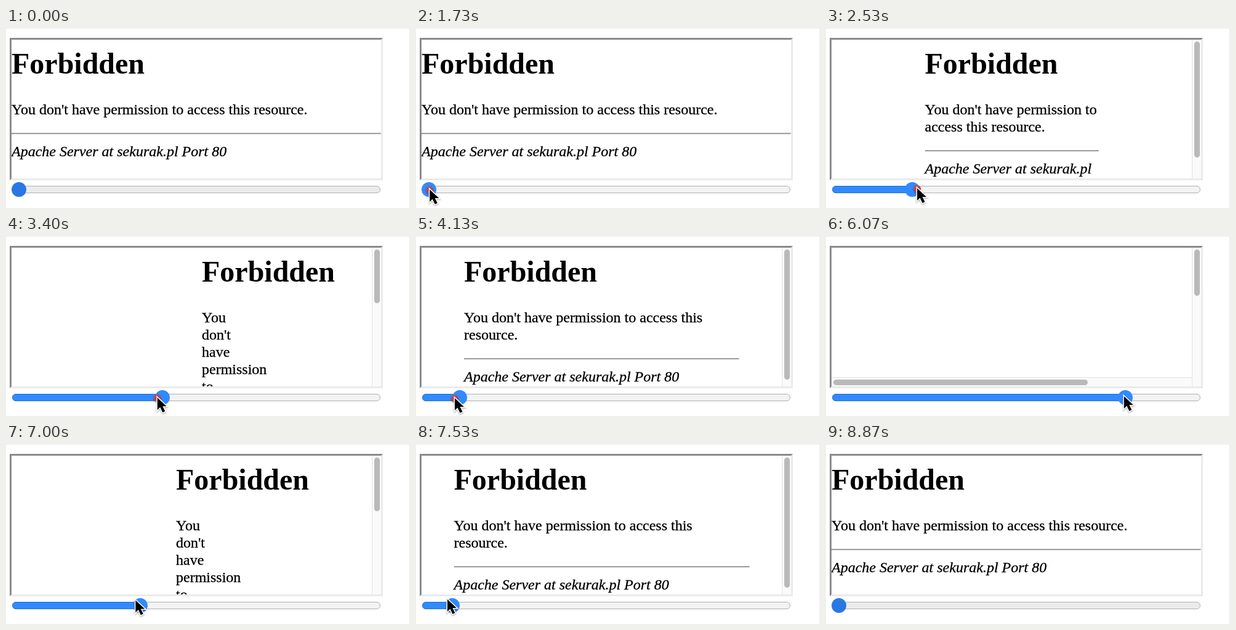
Recreate the animation shown at these times as an HTML page. Size 656 by 292 pixels, loop 9.13 s.

```html
<!DOCTYPE html>
<html lang="en">
<head>
<meta charset="utf-8">
<title>Frame margin slider</title>
<style>
  * { box-sizing: border-box; }
  html, body { margin: 0; width: 100%; height: 100%; overflow: hidden; background: #fff; }
  #stage { position: relative; width: 656px; height: 292px; overflow: hidden;
    border: solid #ebebeb; border-width: 1px 1px 0 0; }
  #stage > *, #frame > * { position: absolute; }
  #frame { left: 6px; top: 15px; width: 606px; height: 231px; overflow: hidden;
    border: 3px solid; border-color: #8b8b8b #ebebeb #ebebeb #8b8b8b; }
  #page { top: 0; padding: 12px 0; color: #000;
    font: 24px/28px "Liberation Serif", "Times New Roman", serif; }
  h1 { margin: 0 0 34px; font-size: 48px; line-height: 53px; }
  p { margin: 0 0 24px; }
  p, em { -webkit-text-stroke: 0.3px #000; }
  hr { margin: 0 0 12.5px; height: 3px; border: solid; border-width: 2px 1px 1px;
    border-color: #a0a0a0 #eee #eee #a0a0a0; }
  .bar { background: #fafafa; border: 0 solid #e2e2e2; }
  .bar i { position: absolute; left: 3px; top: 3px; background: #b9b9b9; border-radius: 5px; }
  #vbar { right: 0; top: 0; width: 15px; height: 225px; border-left-width: 1px; }
  #vbar i { width: 9px; }
  #hbar { left: 0; bottom: 0; width: 600px; height: 15px; border-top-width: 1px; }
  #hbar i { height: 9px; }
  #track, #fill { left: 10px; top: 255px; height: 12px; border: 1px solid #b0b0b0; border-radius: 6px; }
  #track { width: 598px; }
  #fill { background: #318aff; border-color: #2c74cf; }
  #thumb { top: 249px; width: 24px; height: 24px; border-radius: 50%; }
  #cursor { left: 0; top: 0; overflow: visible; filter: drop-shadow(0 1px 1px #0006); }
</style>
</head>
<body>
<div id="stage">
  <div id="frame">
    <div id="page">
      <h1>Forbidden</h1>
      <p>You don't have permission to access this resource.</p>
      <hr>
      <em>Apache Server at sekurak.pl Port 80</em>
    </div>
    <div id="hbar" class="bar"><i></i></div>
    <div id="vbar" class="bar"><i></i></div>
  </div>
  <div id="track"></div>
  <div id="fill"></div>
  <div id="thumb"></div>
  <svg id="cursor" width="20" height="30">
    <circle id="press" cx="1" cy="3" r="4.5" fill="none" stroke="#dc3b3b" stroke-width="3"/>
    <path d="M1 2V22l4.500-4.500 4 8.500 4-2-4-8h6.500z" stroke="#fff" stroke-width="3" paint-order="stroke"/>
  </svg>
</div>
<script>
const LOOP = 9130, STEP = 200 / 3;
const MIN_X = 21, RANGE = 575, MAX_VALUE = 500, SCALE = 1.5;
const VIEW_W = 585, VIEW_H = 225, TITLE_W = 215, BAR = 15;
const PAGE_LAG = 18, CURSOR_LEAD = 60, GRAB = 8;

// The hand's turning points: time, x, y
const path = [
  [600, 21, 296], [1130, 21, 261], [1730, 21, 261], [2533, 140, 259], [3130, 285, 261],
  [4133, 71, 262], [4533, 33, 264], [5267, 223, 267], [6060, 486, 259],
  [7533, 59, 251], [8067, 6, 263], [8270, 6, 263], [8400, 6, 300]
];

const el = id => document.getElementById(id);
const show = (node, on) => node.style.visibility = on ? "visible" : "hidden";
const clamp = (v, lo, hi) => Math.min(hi, Math.max(lo, v));
const [page, vbar, hbar, track, fill, thumb, cursor, press] =
  ["page", "vbar", "hbar", "track", "fill", "thumb", "cursor", "press"].map(el);

// Harmonic mean of the neighbouring slopes, at rest where the direction turns
function slope(i, axis) {
  if (i === 0 || i === path.length - 1) return 0;
  const rate = j => (path[j + 1][axis] - path[j][axis]) / (path[j + 1][0] - path[j][0]);
  const a = rate(i - 1), b = rate(i);
  return a * b > 0 ? 2 * a * b / (a + b) : 0;
}

// Smooth curve through the path that never overshoots
function hand(time, axis) {
  const t = clamp(time, path[0][0], path[path.length - 1][0]);
  const i = Math.max(1, path.findIndex(p => p[0] >= t));
  const a = path[i - 1], b = path[i], span = b[0] - a[0], u = (t - a[0]) / span;
  const ease = u * u * (3 - 2 * u);
  return a[axis] + (b[axis] - a[axis]) * ease +
    span * u * (1 - u) * ((1 - u) * slope(i - 1, axis) - u * slope(i, axis));
}

const thumbX = t => Math.max(MIN_X, hand(t, 1));

function drawPage(x) {
  const margin = SCALE * Math.round((x - MIN_X) / RANGE * MAX_VALUE);
  const tall = margin > 52, wide = margin + TITLE_W > VIEW_W;
  const width = (tall ? VIEW_W : VIEW_W + BAR) - 2 * margin;
  page.style.left = margin + "px";
  page.style.width = Math.max(0, width) + "px";
  show(vbar, tall);
  show(hbar, wide);
  const height = page.offsetHeight + (width < TITLE_W ? 28 : 0);
  const viewH = VIEW_H - (wide ? BAR : 0);
  vbar.firstChild.style.height = (viewH - 5) * Math.min(1, viewH / height) + "px";
  hbar.firstChild.style.width = (VIEW_W - 5) * VIEW_W / (margin + TITLE_W) + "px";
}

function draw(time) {
  const t = Math.floor(time % LOOP / STEP + 0.06) * STEP;
  const x = thumbX(t), handX = hand(t, 1);
  const lead = clamp(hand(t + CURSOR_LEAD, 1) - handX, -GRAB, GRAB);
  const active = t > 1390 && t < 8060, hover = t > 1000 && t < 1390;
  drawPage(thumbX(t - PAGE_LAG));
  track.style.background = active ? "#f3f3f3" : hover ? "#e3e3e3" : "#ebebeb";
  thumb.style.background = active ? "#318aff" : hover ? "#225fc0" : "#2a77e4";
  thumb.style.left = x - 12 + "px";
  fill.style.width = x - 10 + "px";
  show(fill, active);
  cursor.style.transform = `translate(${handX + lead - 1}px, ${hand(t, 2) - 2}px)`;
  show(press, t > 1390 && t < 4550);
}

const start = performance.now();
function tick() {
  draw(performance.now() - start);
  requestAnimationFrame(tick);
}
tick();
</script>
</body>
</html>
```
